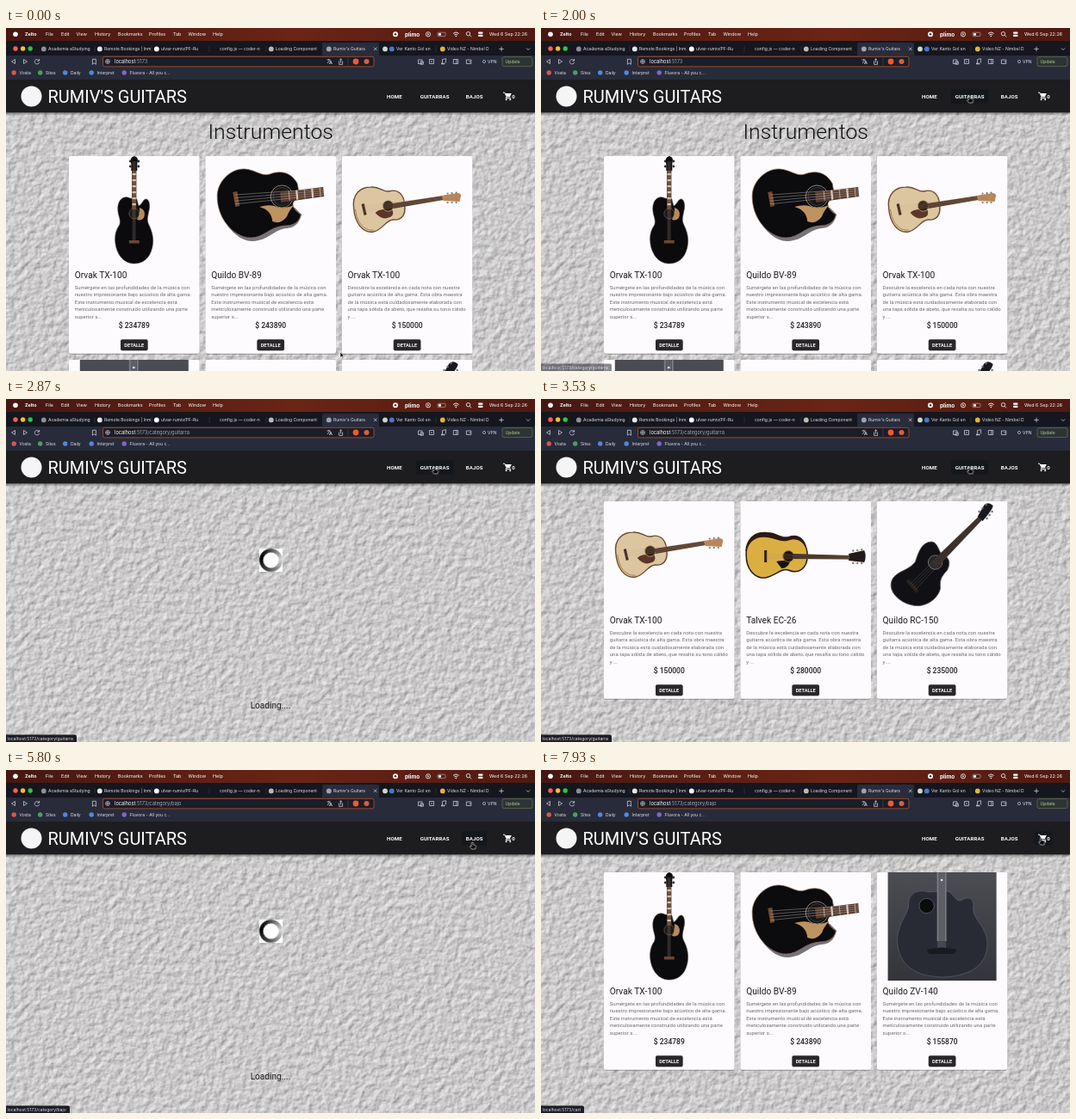
Animation of 614 by 399 pixels, one loop 8 s. Source, as an HTML page:

```html
<!DOCTYPE html>
<html lang="es">
<head>
<meta charset="utf-8">
<title>Rumiv's Guitars</title>
<style>
  html, body { margin: 0; width: 100%; height: 100%; overflow: hidden; background: #c9c7c8; }
  svg { position: absolute; left: 0; top: 0; display: block; }
  #paper { will-change: transform; }
  text { font-family: Roboto, sans-serif; white-space: pre; }
  .ui text { font-family: Inter, sans-serif; font-size: 5px; fill: #e4e4ea; }
  .ui .menu { font-size: 5.4px; fill: #fff; }
  .ui .url { font-size: 5.7px; fill: #fff; }
  .icon { fill: none; stroke: #c9cad4; stroke-width: .8; }
  .nav { font-size: 6.1px; font-weight: 700; fill: #fff; letter-spacing: .1px; }
  .name { font-size: 10.2px; fill: #1d1d1d; }
  .copy { font-size: 5.97px; fill: #6a696b; letter-spacing: .02px; }
  .price { font-size: 8.5px; font-weight: 500; fill: #1d1d1d; text-anchor: middle; }
  .button { font-size: 5.6px; font-weight: 700; fill: #fff; text-anchor: middle; }
  .cursor { fill: #000; stroke: #fff; stroke-width: .6; animation: travel 8s infinite; }
  .fade { animation: fade 8s linear infinite; }
  @keyframes travel {
    0%, 4.125% { transform: matrix(1, 0, 0, 1, 388, 377); animation-timing-function: ease-in-out; }
    23.5%, 51.25% { transform: matrix(1, 0, 0, 1, 497.5, 79); animation-timing-function: ease-in-out; }
    61.9%, 92.75% { transform: matrix(1, 0, 0, 1, 541.3, 84); animation-timing-function: ease-in-out; }
    98.1%, 100% { transform: matrix(1, 0, 0, 1, 580.5, 79); }
  }
  @keyframes fade { 0%, 24.25% { opacity: 0; } 25.75%, 100% { opacity: 1; } }
  @keyframes spin { to { transform: rotate(360deg); } }
  .spinner {
    position: absolute; left: 294px; top: 173.5px; width: 27px; height: 27px; background: #fff;
  }
  .ring {
    width: 27px; height: 27px; border-radius: 50%;
    background: radial-gradient(#fff 0 8.7px, transparent 9.3px),
                conic-gradient(from 130deg, #d5d5d5, #444 32%, #000 55%, #222 68%, #d5d5d5);
    animation: spin 977ms linear -916ms infinite;
  }
</style>
</head>
<body>
<svg id="paper" width="614" height="399">
  <filter id="grain" x="0" y="0" width="100%" height="100%" color-interpolation-filters="sRGB">
    <feTurbulence type="fractalNoise" baseFrequency=".13" numOctaves="4" seed="8"/>
    <feDiffuseLighting surfaceScale="1" lighting-color="#f8f6f7">
      <feDistantLight azimuth="225" elevation="55"/>
    </feDiffuseLighting>
  </filter>
  <rect y="98" width="614" height="301" filter="url(#grain)"/>
</svg>
<svg id="stage" width="614" height="399"></svg>
<div class="spinner loading"><div class="ring"></div></div>
<script>
const LOOP = 8000;
const sheet = document.head.appendChild(document.createElement('style'));

// Shows every element of a class only during the given [start, end] times.
function showDuring(cls, ...spans) {
  const key = (ms, state) => `${ms / LOOP * 100}%{visibility:${state}}`;
  const steps = spans.map(([a, b]) => key(a, 'visible') + key(b, 'hidden')).join('');
  sheet.textContent += `@keyframes ${cls}{0%{visibility:hidden}${steps}}` +
    `.${cls}{animation:${cls} ${LOOP}ms step-end infinite}`;
}

const toGuitars = 2350, guitarsReady = 3300, toBasses = 5650, bassesReady = 6700;
showDuring('home', [0, toGuitars]);
showDuring('at-guitars', [toGuitars, toBasses]);
showDuring('at-basses', [toBasses, LOOP]);
showDuring('loading', [toGuitars, guitarsReady], [toBasses, bassesReady]);
showDuring('guitars', [guitarsReady, toBasses]);
showDuring('basses', [bassesReady, LOOP]);
showDuring('over-guitars', [1860, 4600]);
showDuring('over-basses', [4600, 7650]);
showDuring('over-cart', [7650, LOOP]);
showDuring('arrow', [0, 1860]);
showDuring('hand', [1860, LOOP]);

const rect = (x, y, w, h, fill, more = '') =>
  `<rect x="${x}" y="${y}" width="${w}" height="${h}" fill="${fill}" ${more}/>`;
const dot = (x, y, r, fill, more = '') => `<circle cx="${x}" cy="${y}" r="${r}" fill="${fill}" ${more}/>`;
const path = (d, fill, more = '') => `<path d="${d}" fill="${fill}" ${more}/>`;
const line = (d, color, width = .6) => `<path d="${d}" fill="none" stroke="${color}" stroke-width="${width}"/>`;
const text = (x, y, str, cls = '', more = '') => `<text x="${x}" y="${y}" class="${cls}" ${more}>${str}</text>`;
const icon = d => `<path d="${d}" class="icon"/>`;
const group = (cls, body) => `<g class="${cls}">${body}</g>`;
const shift = (x, y, body) => `<g transform="matrix(1 0 0 1 ${x} ${y})">${body}</g>`;
const repeat = (n, fn) => Array.from({ length: n }, (_, i) => fn(i)).join('');

// Instrument pictures, each on a 126 x 126 square.
const art = {
  uprightBass:
    path('M58 49C50 45 44 52 44 61C44 70 48 73 46 80C40 88 40 98 42 106C46 121 56 125 63 125C72 125 81 120 84 106C86 96 84 88 80 80C77 74 79 70 80 64C82 57 80 50 77 50C73 50 72 57 68 58L66 50Z', '#0b0a0c', 'stroke="#4b4140" stroke-width=".6"') +
    dot(63, 67, 6, '#1c1817', 'stroke="#77685c" stroke-width=".6"') +
    path('M69 60Q76 62 75 69Q74 76 66 74Q70 69 69 60Z', '#b78a5a') +
    rect(60.2, 16, 5.4, 46, '#5d3d2b') +
    repeat(6, i => rect(60.8, 20 + i * 7, 4.2, 2.2, '#d9cfc4')) +
    path('M59.5 17V9Q57 2 63 0Q69 1 66.5 9V17Z', '#100d0e') +
    repeat(2, i => dot(58.5, 6 + i * 6, 1.4, '#2b2827') + dot(68, 6 + i * 6, 1.4, '#2b2827')) +
    repeat(4, i => line(`M${61.3 + i} 6V99`, '#a89a8c', .25)) +
    rect(57, 98, 12, 3.5, '#6d4630'),

  tiltedBass:
    path('M2 50C0 66 20 100 42 99C62 98 66 85 82 84C94 83 97 74 99 68L91 60Z', '#77737a') +
    path('M1 45C2 28 18 14 33 15C46 16 52 24 62 21C75 16 87 19 94 32L97 49C84 52 88 62 98 68C96 78 88 81 79 81C62 82 55 95 40 95C20 95 0 72 1 45Z', '#0c0b0d', 'stroke="#8b6a56" stroke-width=".7"') +
    dot(76, 47, 13, 'none', 'stroke="#8f8378" stroke-width="1"') +
    dot(76, 47, 10.5, '#191618', 'stroke="#4d4641" stroke-width=".8"') +
    path('M50 59Q60 56 67 58Q78 63 90 57Q84 64 82 70Q75 80 65 76Q64 63 50 59Z', '#bd935f') +
    path('M74 42L124 36L125 47L75 54Z', '#55392c') +
    repeat(5, i => line(`M${84 + i * 9} ${40.7 - i}l1 11`, '#d8cabb', i % 2 ? 2.2 : .7)) +
    path('M19 42L24 41L27 58L22 59Z', '#74482f') +
    repeat(4, i => line(`M22 ${45 + i * 3.6}L125 ${38 + i * 2.3}`, '#d0cac4', .4)),

  natural:
    path('M1 60C-1 44 9 36 21 36C31 35 35 42 42 41C51 38 59 43 60 56C62 69 56 75 47 74C38 74 36 85 24 88C11 90 2 77 1 60Z', '#dcc6a0', 'stroke="#6e4a31" stroke-width="1.4"') +
    line('M3 62C5 79 14 87 24 86', '#a97d52', 1) +
    path('M26 66Q31 60 46 63Q49 70 40 72Q33 74 26 66Z', '#5c3626') +
    dot(41, 58, 6.3, '#352219', 'stroke="#b59268" stroke-width="1"') +
    path('M46 55L105 46L105 51L47 61Z', '#503426') +
    path('M103 46L122 43Q127 44 125 48L124 53L105 52Z', '#b9855a') +
    repeat(3, i => dot(110 + i * 5, 43.5 - i * .4, 1.1, '#777') + dot(110 + i * 5, 54, 1.1, '#777')) +
    path('M10 56L13 55L16 68L13 69Z', '#4b2e20') +
    repeat(4, i => line(`M13 ${58 + i * 2.2}L106 ${47 + i * 1.1}`, '#b8a68b', .25)),

  amber:
    path('M-7 58C-6 42 6 34 18 36C30 36 34 43 43 41C54 37 64 43 65 60L40 66Z', '#2d1a12') +
    path('M-6 63C-7 48 4 40 16 41C27 41 33 48 42 45C54 40 65 48 65 63C65 79 54 85 43 80C35 77 28 87 16 89C3 90-6 78-6 63Z', '#dbae42', 'stroke="#2a1b12" stroke-width="1.5"') +
    path('M29 70Q36 68 45 70Q42 78 35 78Z', '#17110f') +
    dot(43, 64, 6.4, '#18110e', 'stroke="#8f6a2c" stroke-width=".9"') +
    path('M48 61L114 63V67.5L48 67Z', '#30221d') +
    path('M113 61L131 57Q134 64 131 71L113 69Z', '#24191a') +
    repeat(3, i => dot(118 + i * 5, 57.5 - i * .6, 1.2, '#8a8178') + dot(118 + i * 5, 72, 1.2, '#8a8178')) +
    rect(15, 57, 3, 14, '#2c1b13') +
    repeat(4, i => line(`M17 ${61 + i * 2}L114 ${63.5 + i}`, '#b79a66', .3)),

  black:
    path('M5 91C10 81 26 80 32 70C36 57 40 48 50 47C57 47 58 55 62 61C72 65 73 72 69 80C62 88 60 91 61 101C58 115 42 124 29 121C13 118-1 104 5 91Z', '#111115', 'stroke="#55545b" stroke-width=".8"') +
    dot(55, 71, 8.2, '#27262a', 'stroke="#736e6d" stroke-width="1"') +
    path('M51 70L106 17L110 21L58 76Z', '#342724') +
    path('M104 18L112 4Q117 0 122 5Q122 9 110 23Z', '#19191d') +
    repeat(3, i => dot(106 + i * 4, 12 - i * 4, 1.2, '#6e6e73') + dot(115 + i * 3, 20 - i * 4, 1.2, '#6e6e73')) +
    path('M21 93L24 90L36 104L33 107Z', '#28211f') +
    repeat(4, i => line(`M${26 + i * 2} ${96 + i * 2.2}L${106 + i} ${18 + i}`, '#96918e', .25)),

  photo:
    rect(0, 0, 126, 126, 'url(#dusk)') +
    path('M47 23C34 19 24 25 24 37C25 47 13 56 11 76C10 101 24 121 63 122C103 121 118 102 115 77C111 60 99 54 99 42C101 31 95 28 88 31C79 38 77 24 69 22Z', '#292b34', 'stroke="#5d606b" stroke-width=".7"') +
    dot(45, 39, 8.7, '#0c0c0f', 'stroke="#50525c" stroke-width="1"') +
    rect(57, 0, 11, 80, '#73747c') + rect(58.5, 0, 8, 80, '#484950') +
    repeat(5, i => line(`M${58.5 + i * 2} 0V92`, '#b9bac1', .4)) +
    dot(62.5, 9, 1.3, '#e9e9ec') +
    path('M45 90Q62 85 80 90L77 95H48Z', '#191a20')
};

const bassCopy = ['Sumérgete en las profundidades de la música con', 'nuestro impresionante bajo acústico de alta gama.',
  'Este instrumento musical de excelencia está', 'meticulosamente construido utilizando una parte', 'superior s...'];
const guitarCopy = ['Descubre la excelencia en cada nota con nuestra', 'guitarra acústica de alta gama. Esta obra maestra',
  'de la música está cuidadosamente elaborada con', 'una tapa sólida de abeto, que resalta su tono cálido', 'y ...'];

const items = {
  upright: [art.uprightBass, 'Orvak TX-100', bassCopy, 234789],
  tilted: [art.tiltedBass, 'Quildo BV-89', bassCopy, 243890],
  photo: [art.photo, 'Quildo ZV-140', bassCopy, 155870],
  natural: [art.natural, 'Orvak TX-100', guitarCopy, 150000],
  amber: [art.amber, 'Talvek EC-26', guitarCopy, 280000],
  black: [art.black, 'Quildo RC-150', guitarCopy, 235000]
};

function card([picture, name, copy, price], column) {
  return shift(73 + column * 158.4, 0,
    rect(0, .8, 151.6, 230, '#000', 'rx="2" opacity=".28"') +
    rect(0, 0, 151.6, 229.7, '#fdfbfd', 'rx="1.8"') +
    shift(12.8, 0, picture) +
    text(6.8, 142, name, 'name') +
    copy.map((words, i) => text(6.8, 154.8 + i * 8.45, words, 'copy')).join('') +
    text(75.8, 199.6, '$ ' + price, 'price') +
    rect(60, 213.9, 31.6, 13, '#000', 'rx="1.8" opacity=".25"') +
    rect(60, 213.3, 31.6, 12.8, '#29272a', 'rx="1.8"') +
    text(75.8, 221.8, 'DETALLE', 'button'));
}
const row = (top, ...keys) => shift(0, top, keys.map((k, i) => card(items[k], i)).join(''));

const menuBar = rect(0, 0, 614, 15, 'url(#ember)') + dot(11, 7.3, 2.8, '#fff') +
  text(22, 9.3, 'Zelto', 'menu', 'font-weight="700"') +
  [[46, 'File'], [64, 'Edit'], [81.5, 'View'], [103, 'History'], [130, 'Bookmarks'], [166, 'Profiles'],
   [194, 'Tab'], [211.5, 'Window'], [240, 'Help'], [561, 'Wed 6 Sep 22:26']]
    .map(([x, s]) => text(x, 9.3, s, 'menu')).join('') +
  dot(452, 7.3, 3, '#fff') + dot(452, 7.3, 1.2, '#5b2015') +
  text(463, 9.5, 'plimo', 'menu', 'font-weight="700" style="font-size:6.4px"') +
  dot(490, 7.3, 2.6, 'none', 'stroke="#fff" stroke-width=".8"') + path('M489.3 6v2.6l2-1.3z', '#fff') +
  rect(501, 5.2, 9, 4.4, 'none', 'rx="1.2" stroke="#cbb" stroke-width=".6"') + rect(502, 6.2, 3, 2.4, '#fff') +
  line('M519 6.4Q522.3 3.4 525.6 6.4M520.4 8Q522.3 6.3 524.2 8', '#fff', .9) + dot(522.3, 9.5, .8, '#fff') +
  dot(536.5, 6.7, 2.2, 'none', 'stroke="#fff" stroke-width=".8"') + line('M538.2 8.4l2 2', '#fff', .8) +
  rect(548, 4.6, 5.6, 2.2, '#fff', 'rx="1.1"') + rect(548, 7.8, 5.6, 2.2, '#fff', 'rx="1.1"');

const tabs = [[49, 'Academia aStudying', '#8d8f9b'], [114, 'Remote Bookings | Inm', '#e8e8ec'], [180, 'ulvar-rumiv/PF-Ru', '#fff'],
  [248, 'config.js — coder-n'], [313, 'Loading Component', '#b9bbb5'], [380, "Rumiv's Guitars", '#9fa4b3'],
  [453, 'Ver Kanto Gol en', '#4779c9'], [512, 'Video NZ - Nimbel D', '#e0b53f']];
const tabStrip = rect(0, 15, 614, 17, '#15161e') + rect(367, 17, 66, 16, '#292c3b', 'rx="2"') +
  dot(11, 24, 2.7, '#ff5f57') + dot(19.6, 24, 2.7, '#febc2e') + dot(28.2, 24, 2.7, '#28c840') +
  tabs.map(([x, s, c]) => (c ? dot(x - 5.2, 24.4, 2.9, c) : '') + text(x, 26.2, s)).join('') +
  dot(440, 24.4, 2.9, '#c9d8cf') + icon('M427 22.6l3.4 3.4m0-3.4l-3.4 3.4M572.3 24.4h5.4m-2.7-2.7v5.4M604 23.5l2 2 2-2') +
  [103, 169, 236, 302, 499].map(x => line(`M${x} 21v7`, '#3a3c49', .6)).join('');

const toolIcons = [
  'M10.5 36.5L6.5 39l4 2.5z', 'M20.5 36.5l4 2.5-4 2.5z', 'M38.4 38a2.7 2.7 0 1 0 .2 2M38.6 36v2.2h-2.2',
  'M100.4 36.3h4v6l-2-1.6-2 1.6z', 'M115.6 39h4.8M118 36.6v4.8',
  'M372.5 37h4M374.5 36v1M373 41l3-4M375.3 42l1.6-4 1.6 4M376 40.8h2',
  'M386.6 38.4v4h4v-4M388.6 40.6v-4.8l-1.4 1.4m1.4-1.4l1.4 1.4',
  'M478.5 37h4.5v4.5h-4.5zM481 39.2h3.4v3H481z', 'M491.5 36.5h5v5h-5zM493 39h2', 'M506.5 41.5v-5l4-.8v4.8',
  'M519.3 36.5h5.4v5h-5.4zM522.8 36.5v5', 'M534.4 37h5.4v4.5h-5.4zM537.5 39.2h2.3', 'M602 37.2h4.6M602 39h4.6M602 40.8h4.6'];
const address = (cls, route) => text(126, 41.2, `localhost<tspan fill="#a5a6b2">:5173${route}</tspan>`, 'url ' + cls);
const toolbar = rect(0, 32, 614, 28, '#282b3a') +
  rect(112.5, 33.3, 314.5, 11.6, '#1b1d28', 'rx="2" stroke="#b8552f" stroke-width=".8"') +
  dot(118, 39, 2.5, 'none', 'stroke="#c9cad4" stroke-width=".6"') +
  toolIcons.map(icon).join('') + dot(508.3, 41.6, 1, '#c9cad4') + dot(506, 41.6, 1, '#c9cad4') +
  line('M397 34.5v9', '#4b4d59') + dot(406, 39, 3.4, '#ee5a31') + dot(418.5, 39, 3, '#d5603c') +
  dot(555, 39, 1.6, 'none', 'stroke="#c9cad4" stroke-width=".7"') + text(559, 41, 'VPN') +
  rect(576, 33.6, 35, 11, '#2c3436', 'rx="2" stroke="#69774d" stroke-width=".7"') +
  text(579.5, 41, 'Update', '', 'style="fill:#b9cf8e"') +
  address('home', '') + address('at-guitars', '/category/guitarra') + address('at-basses', '/category/bajo') +
  [[15.5, 'Vosta', '#d9584a'], [46, 'Sites', '#4b9f62'], [75, 'Daily', '#5387de'], [105.5, 'Interpret', '#5387de'],
   [143.5, 'Fluvora - All you c...', '#8066c9']]
    .map(([x, s, c]) => dot(x - 6.3, 52, 2.7, c) + text(x, 53.9, s)).join('');

const hover = (cls, x, w) => rect(x, 71.5, w, 16, '#14171b', `rx="1.8" class="${cls}"`);
const header = rect(0, 98, 614, 4, 'url(#drop)') + rect(0, 60, 614, 38.3, '#1d1c1f') +
  dot(29.5, 79.5, 12, '#f6f5f6') +
  text(48.5, 86.7, "RUMIV'S GUITARS", '', 'fill="#fff" font-size="20"') +
  hover('over-guitars', 476, 43) + hover('over-basses', 529, 29) + hover('over-cart', 573, 21) +
  text(442, 81.6, 'HOME', 'nav') + text(480.7, 81.6, 'GUITARRAS', 'nav') + text(533.8, 81.6, 'BAJOS', 'nav') +
  line('M577 75.2h1.8l2.2 4.6h4.3', '#fff', 1) + path('M579.4 76h7.4l-2 4h-3.6z', '#fff') +
  line('M581 80l-.9 1.6h6', '#fff', .9) + dot(580.6, 83.2, 1, '#fff') + dot(585.2, 83.2, 1, '#fff') +
  text(587.2, 81.6, '0', 'nav');

const status = (cls, width, route) => group(cls,
  path(`M0 390.5H${width - 2}q2 0 2 2V399H0z`, '#1c1d25') + text(1.5, 396.6, 'localhost:5173' + route));

document.getElementById('stage').innerHTML = `<defs>
  <linearGradient id="ember"><stop stop-color="#451712"/><stop offset=".55" stop-color="#6a2515"/><stop offset="1" stop-color="#4e1912"/></linearGradient>
  <linearGradient id="drop" x2="0" y2="1"><stop stop-opacity=".4"/><stop offset="1" stop-opacity="0"/></linearGradient>
  <linearGradient id="dusk" x2="0" y2="1"><stop stop-color="#4c4d53"/><stop offset="1" stop-color="#34353b"/></linearGradient>
  </defs>` +
  group('home', text(307.2, 128.7, 'Instrumentos', '', 'font-size="24.8" font-weight="300" fill="#111" text-anchor="middle"') +
    row(149, 'upright', 'tilted', 'natural') + row(386, 'photo', 'amber', 'black')) +
  group('loading', text(307, 359.5, 'Loading....', '', 'font-size="10.1" fill="#222" text-anchor="middle"')) +
  group('guitars', row(119, 'natural', 'amber', 'black')) +
  group('basses', row(119, 'upright', 'tilted', 'photo')) +
  header + group('ui', menuBar + tabStrip + toolbar) +
  group('ui fade', status('over-guitars', 82, '/category/guitarra') +
    status('over-basses', 74, '/category/bajo') + status('over-cart', 50, '/cart')) +
  group('cursor',
    `<path class="arrow" d="M0 0V6.2L1.5 5 2.5 7.1 3.5 6.6 2.5 4.6H4.5Z"/>` +
    `<path class="hand" d="M-1 .7Q0-.8 1 .7V3L3.4 3.6Q4.4 4 4 5.8L3.4 8H-.8L-2.8 5.2Q-2.6 4-1 4.9Z"/>`);
</script>
</body>
</html>
```
